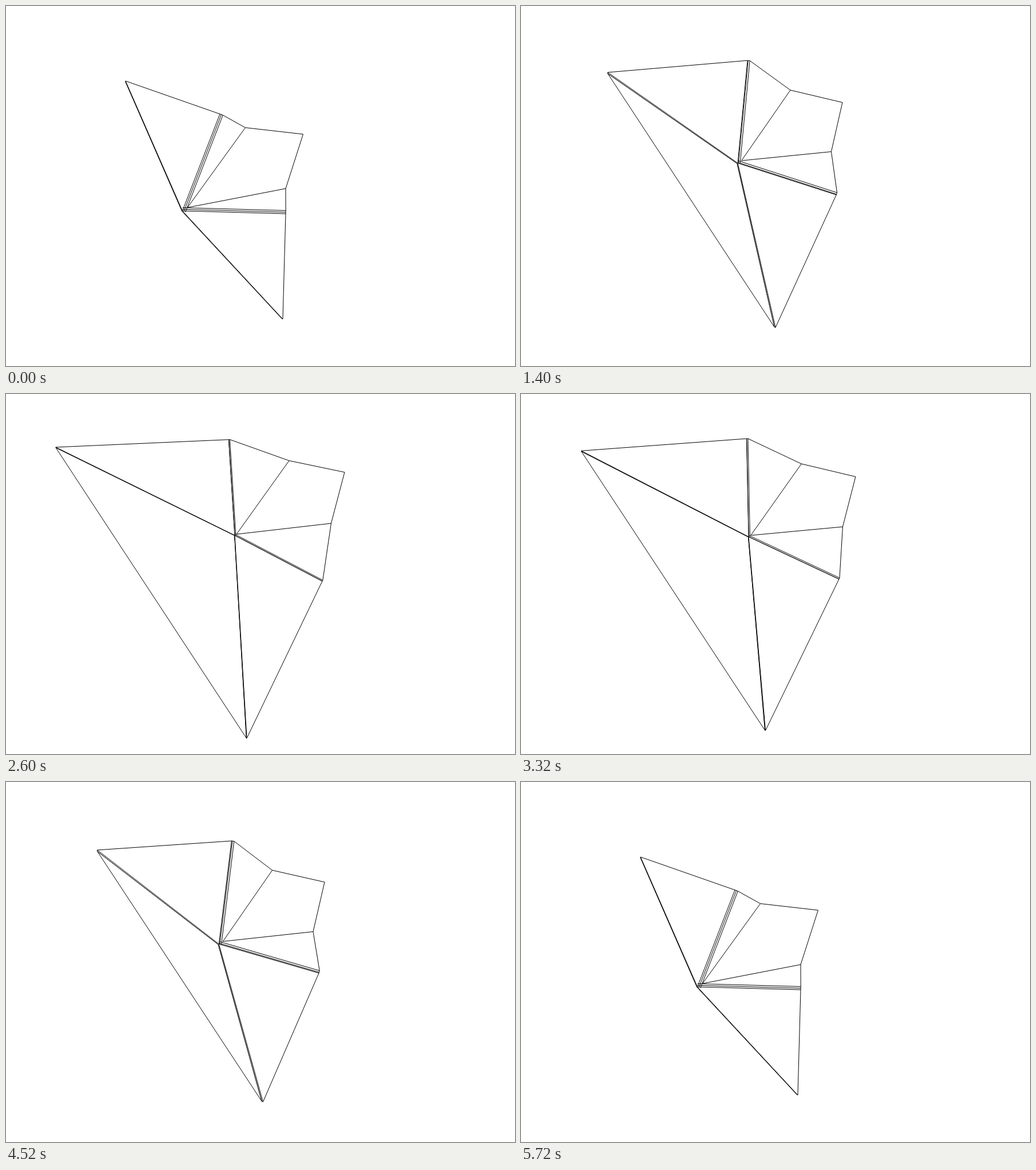
Animation of 890 by 629 pixels, one loop 5.76 s. Source, as an HTML page:

```html
<!DOCTYPE html>
<html lang="en">
<head>
<meta charset="utf-8">
<title>Folding panels</title>
<style>
html, body { margin: 0; width: 100%; height: 100%; overflow: hidden; background: #fff; }
svg { display: block; width: 890px; height: 629px; }
path { fill: none; stroke: #000; stroke-width: 1; stroke-linejoin: bevel; }
.panel { fill: #fff; }
</style>
</head>
<body>
<svg viewBox="0 0 890 629">
  <path id="base" class="panel"/>
  <path id="outline" class="panel"/>
  <path id="creases"/>
</svg>
<script>
const LOOP = 5760, STEP = 40, OPEN = 2860;
const AXIS = [0.834, -0.551];

// Each pose: time, tips A F E C G H B, hub O, then the three crease gaps.
const POSES = [
  [0, 209, 131, 374, 188.7, 418.5, 212.5, 519.5, 224, 489, 319, 489, 363, 484, 547, 308.5, 358, 1.5, 2.7, 2.9],
  [720, 179, 125, 388, 127.7, 449.5, 174, 544, 192, 521, 281, 531.5, 345, 461.3, 553, 352, 308.5, 2.6, 2.2, 2.8],
  [1400, 151.7, 116, 396, 95.2, 471, 147, 562, 168.5, 542.5, 254.5, 551.3, 330, 445, 561.7, 379, 274.5, 2.1, 1.2, 2.9],
  [1720, 139, 111, 397, 85, 478, 136.5, 569.5, 159, 550, 244.5, 556, 325, 438.5, 566.7, 388, 263, 1.9, 0.9, 2.7],
  [2400, 105.5, 99.3, 394.5, 78, 490.3, 122, 585, 144.5, 562.5, 232, 556, 323.5, 427.5, 588, 398, 249.5, 1, 0.2, 2.2],
  [2600, 87, 93, 389.5, 79.7, 495, 116.5, 592, 136.7, 568.5, 226, 553, 327, 421, 601.5, 400, 247, 0.7, 0, 1.9],
  [OPEN, 73, 88, 384, 82, 495, 113, 594, 133, 569, 223, 548, 331.5, 417, 609, 396, 249, 0.5, 0, 1.5]
];

const chord = (i, k) => (POSES[i + 1][k] - POSES[i][k]) / (POSES[i + 1][0] - POSES[i][0]);

// Three-point slope; the sheet comes to rest when fully open.
function slope(i, k) {
  if (i === POSES.length - 1) return 0;
  const j = Math.max(i, 1);
  const before = POSES[j][0] - POSES[j - 1][0], after = POSES[j + 1][0] - POSES[j][0];
  const mid = (chord(j - 1, k) * after + chord(j, k) * before) / (before + after);
  return i ? mid : 2 * chord(0, k) - mid;
}

function poseAt(t) {
  let i = 0;
  while (i < POSES.length - 2 && t > POSES[i + 1][0]) i++;
  const a = POSES[i], b = POSES[i + 1], h = b[0] - a[0], u = (t - a[0]) / h, v = 1 - u;
  return a.slice(1).map((start, n) => {
    const k = n + 1;
    return v * v * (1 + 2 * u) * start + u * u * (3 - 2 * u) * b[k]
      + h * u * v * (v * slope(i, k) - u * slope(i + 1, k));
  });
}

const shift = (p, d, s) => [p[0] + d[0] * s, p[1] + d[1] * s];
const path = points => "M" + points.map(p => p[0].toFixed(2) + " " + p[1].toFixed(2)).join("L");
const setPath = (id, d) => document.getElementById(id).setAttribute("d", d);

function normal(from, to, side) {
  const x = to[0] - from[0], y = to[1] - from[1], s = side / Math.hypot(x, y);
  return [-y * s, x * s];
}

function draw(t) {
  const values = poseAt(t > OPEN ? 2 * OPEN - t : t);
  const [A, F, E, C, G, H, B, O] = Array.from({ length: 8 }, (_, i) => values.slice(2 * i, 2 * i + 2));
  const [backGap, gap1, gap2] = values.slice(16);
  const gap = gap1 + gap2;
  const nF = normal(O, F, 1), nH = normal(O, H, -1);
  const backA = shift(A, [0, 1], backGap);
  const backB = shift(B, [-0.92, -0.39], backGap);
  const backO = shift(O, [-0.5, 0.33], backGap);
  const outerF = shift(F, nF, gap), outerH = shift(H, nH, gap);
  const inner = shift(O, AXIS, 1.9 * gap);

  setPath("base", path([backA, backB, backO]) + "Z");
  setPath("outline", path([A, F, outerF, E, C, G, outerH, H, B, backB, backO, backA]) + "Z");
  const lines = [[A, O, B], [E, inner, G]];
  for (const g of [0, gap1, gap]) {
    lines.push([shift(F, nF, g), shift(O, nF, g)], [shift(H, nH, g), shift(O, nH, g)]);
  }
  setPath("creases", lines.map(path).join(""));
}

const began = performance.now();
function frame() {
  const t = (performance.now() - began) % LOOP;
  draw(Math.floor(t / STEP) * STEP);
  requestAnimationFrame(frame);
}
frame();
</script>
</body>
</html>
```
